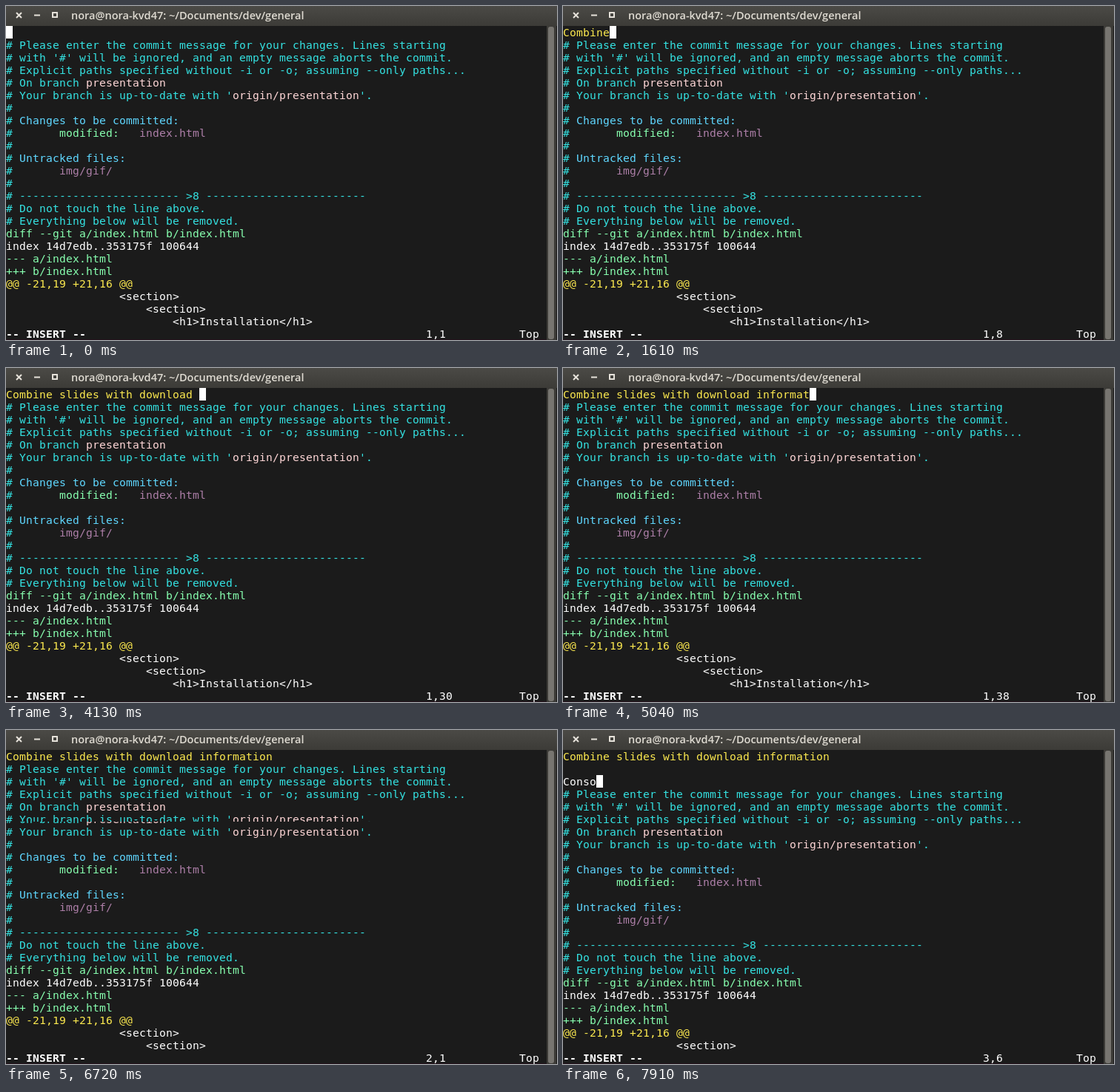
These frames come from a looping animation (744 by 452 pixels, 8 s). An HTML page with a canvas:

```html
<!DOCTYPE html>
<html lang="en">
<head>
<meta charset="utf-8">
<title>Commit message</title>
<style>
  html, body { margin: 0; width: 100%; height: 100%; overflow: hidden; background: #1b1b1b; }
  canvas { display: block; }
</style>
</head>
<body>
<canvas id="stage" width="744" height="452"></canvas>
<script>
const ctx = document.getElementById('stage').getContext('2d');
const LOOP = 8000, CELL = 9, ROW = 17, TOP = 27, ROWS = 24, ASCENT = 14;
const MONO = '14.667px "DejaVu Sans Mono", monospace';
const BG = '#1b1b1b', WHITE = '#ffffff', CYAN = '#34e2e2', BLUE = '#5fd7ff',
      PINK = '#ffd7d7', GREEN = '#87ffaf', PURPLE = '#ad7fa8', YELLOW = '#fce94f';

const SUMMARY = 'Combine slides with download information';
const BODY = 'Conso';
const SUMMARY_KEYS = [
  420, 630, 840, 1260, 1400, 1470, 1610, 1750, 1890, 2030, 2100, 2240,
  2380, 2450, 2590, 2660, 2800, 2870, 2940, 3080, 3290, 3290,
  3430, 3570, 3640, 3780, 3920, 3990, 4130, 4340, 4410,
  4480, 4620, 4690, 4830, 4900, 5040, 5880, 5950, 6020
];
const BODY_KEYS = [7210, 7280, 7420, 7490, 7910];
const ENTER = 6720, ENTER_DONE = 6790, SECOND_ENTER = 6860, TEAR_Y = 124;
const CURSOR_OFF = [[140, 420], [5600, 5880], [6650, ENTER_DONE]];

// Each line is a list of [colour, text] runs.
const comment = text => [[CYAN, '# ' + text]];
const header = text => [[CYAN, '# '], [BLUE, text]];
const plain = (indent, text) => [[WHITE, ' '.repeat(indent) + text]];
const dashes = '-'.repeat(24);
const TEMPLATE = [
  comment('Please enter the commit message for your changes. Lines starting'),
  comment("with '#' will be ignored, and an empty message aborts the commit."),
  comment('Explicit paths specified without -i or -o; assuming --only paths...'),
  [[CYAN, '# On branch '], [PINK, 'presentation']],
  [[CYAN, "# Your branch is up-to-date with '"], [PINK, 'origin/presentation'], [CYAN, "'."]],
  comment(''),
  header('Changes to be committed:'),
  [[CYAN, '#       '], [GREEN, 'modified:   '], [PURPLE, 'index.html']],
  comment(''),
  header('Untracked files:'),
  [[CYAN, '#       '], [PURPLE, 'img/gif/']],
  comment(''),
  comment(`${dashes} >8 ${dashes}`),
  comment('Do not touch the line above.'),
  comment('Everything below will be removed.'),
  [[GREEN, 'diff --git a/index.html b/index.html']],
  plain(0, 'index 14d7edb..353175f 100644'),
  [[GREEN, '--- a/index.html']],
  [[GREEN, '+++ b/index.html']],
  [[YELLOW, '@@ -21,19 +21,16 @@']],
  plain(17, '<section>'),
  plain(21, '<section>'),
  plain(25, '<h1>Installation</h1>')
];

function rect(color, x, y, w, h) {
  ctx.fillStyle = color;
  ctx.fillRect(x, y, w, h);
}

function write(text, col, row, color, weight = '') {
  ctx.font = `${weight} ${MONO}`;
  ctx.fillStyle = color;
  [...text].forEach((char, i) => {
    if (char !== ' ') ctx.fillText(char, (col + i) * CELL, TOP + row * ROW + ASCENT);
  });
}

function drawLines(message) {
  rect(BG, 0, TOP, 730, ROWS * ROW);
  [...message, ...TEMPLATE].slice(0, ROWS).forEach((runs, row) => {
    let col = 0;
    for (const [color, text] of runs) {
      write(text, col, row, color);
      col += text.length;
    }
  });
}

function clipped(top, bottom, draw) {
  ctx.save();
  ctx.beginPath();
  ctx.rect(0, top, 730, bottom - top);
  ctx.clip();
  draw();
  ctx.restore();
}

function drawWindow() {
  rect(BG, 0, 0, 744, 452);
  const bar = ctx.createLinearGradient(0, 0, 0, TOP);
  bar.addColorStop(0, '#4b4a46');
  bar.addColorStop(1, '#3c3b37');
  rect(bar, 0, 0, 744, TOP);

  ctx.strokeStyle = '#e6e2da';
  ctx.lineWidth = 2;
  ctx.beginPath();
  ctx.moveTo(14, 9); ctx.lineTo(21, 16);
  ctx.moveTo(21, 9); ctx.lineTo(14, 16);
  ctx.moveTo(38, 12.5); ctx.lineTo(46, 12.5);
  ctx.stroke();
  ctx.strokeRect(63, 9, 6, 6);

  ctx.font = '600 14.5px "Open Sans", sans-serif';
  ctx.fillStyle = '#dfdbd2';
  ctx.fillText('nora@nora-kvd47: ~/Documents/dev/general', 88, 18);

  rect('#3c3b37', 730, TOP, 13, 425);
  rect('#1b1b1b', 743, TOP, 1, 425);
  ctx.fillStyle = '#777570';
  ctx.beginPath();
  ctx.roundRect(732, 28, 8, 423, 3);
  ctx.fill();
  rect('#23121b', 0, 451, 730, 1);
}

function draw(t) {
  const pressed = keys => keys.filter(time => time <= t).length;
  const summary = SUMMARY.slice(0, pressed(SUMMARY_KEYS));
  const body = BODY.slice(0, pressed(BODY_KEYS));
  const first = [[YELLOW, summary]];
  const line = t >= SECOND_ENTER ? 2 : t >= ENTER ? 1 : 0;
  const col = [summary.length, 0, body.length][line];
  const message = [first, [], [[WHITE, body]]].slice(0, line + 1);

  drawWindow();
  if (t >= ENTER && t < ENTER_DONE) {
    clipped(TOP, TEAR_Y, () => drawLines([first]));
    clipped(TEAR_Y, TOP + ROWS * ROW, () => drawLines(message));
  } else {
    drawLines(message);
  }

  if (!CURSOR_OFF.some(([from, to]) => t >= from && t < to)) {
    rect(WHITE, col * CELL, TOP + line * ROW, CELL, ROW);
  }
  write('-- INSERT --', 0, ROWS, WHITE, 'bold');
  write(`${line + 1},${col + 1}`, 63, ROWS, WHITE);
  write('Top', 77, ROWS, WHITE);
}

const start = performance.now();
function tick() {
  draw((performance.now() - start) % LOOP);
  requestAnimationFrame(tick);
}
tick();
</script>
</body>
</html>
```
